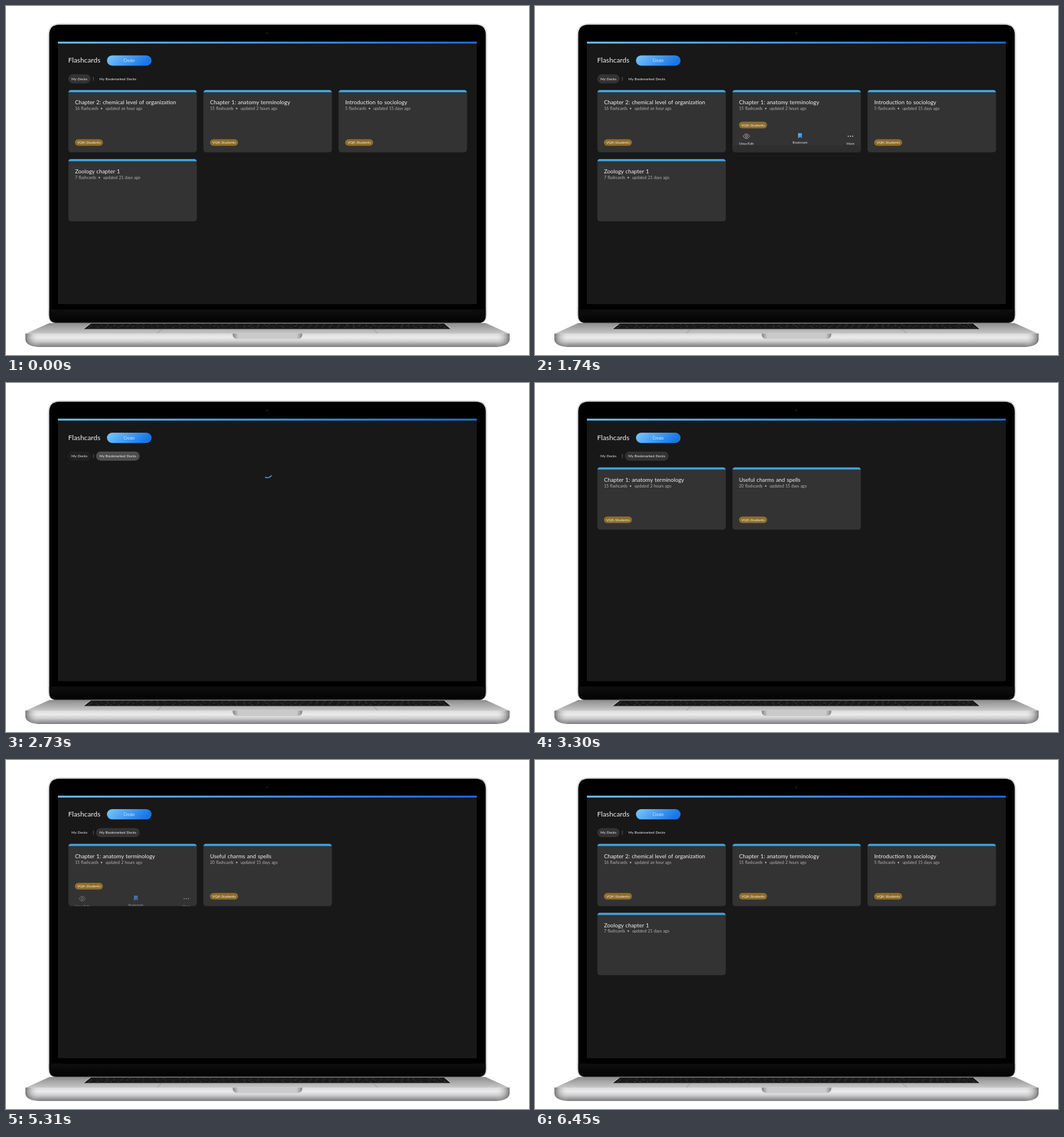
An HTML page for the animation above (6.51 s loop, 917x611 px).

```html
<!DOCTYPE html>
<html lang="en">
<head>
<meta charset="utf-8">
<title>Flashcards</title>
<style>
html, body { margin: 0; width: 100%; height: 100%; overflow: hidden; background: #fff; }
svg { display: block; width: 917px; height: 611px; }
text { font-family: Lato, "Open Sans", sans-serif; fill: #f2f2f2; word-spacing: .065em; }
.head { font-size: 12.3px; }
.title { font-size: 9.8px; }
.sub { font-size: 7px; fill: #b4b4b4; }
.tab { font-size: 6.3px; }
.tag { font-size: 6.5px; }
.act { font-size: 5.9px; fill: #dcdcdc; }
.mid { text-anchor: middle; }
.line { fill: none; stroke: #cfcfcf; stroke-width: .8; }
</style>
</head>
<body>
<svg viewBox="0 0 917 611" xmlns="http://www.w3.org/2000/svg">
  <defs>
    <linearGradient id="bar"><stop stop-color="#70c4fb"/><stop offset=".5" stop-color="#419bed"/><stop offset="1" stop-color="#1a70e0"/></linearGradient>
    <linearGradient id="btn" x2="1" y2=".25"><stop stop-color="#7ac8fc"/><stop offset="1" stop-color="#1976e6"/></linearGradient>
    <linearGradient id="mark" x2="1" y2="1"><stop stop-color="#6fc0fa"/><stop offset="1" stop-color="#1c78e6"/></linearGradient>
    <linearGradient id="shade" x2="0" y2="1"><stop stop-color="#2f2f2f"/><stop offset="1" stop-color="#272727"/></linearGradient>
    <linearGradient id="chin" x2="0" y2="1"><stop stop-color="#0f0f0f"/><stop offset="1" stop-color="#020202"/></linearGradient>
    <linearGradient id="deck" x2="0" y2="1"><stop stop-color="#8d8d8e"/><stop offset="1" stop-color="#c9c9ca"/></linearGradient>
    <linearGradient id="front" x2="0" y2="1"><stop stop-color="#dcdcdd"/><stop offset=".3" stop-color="#ebebec"/><stop offset=".58" stop-color="#cdcdce"/><stop offset=".8" stop-color="#a0a0a2"/><stop offset="1" stop-color="#7e7e80"/></linearGradient>
    <linearGradient id="ends"><stop stop-color="#444" stop-opacity=".7"/><stop offset=".012" stop-color="#777" stop-opacity=".3"/><stop offset=".03" stop-color="#fff" stop-opacity="0"/><stop offset=".97" stop-color="#fff" stop-opacity="0"/><stop offset=".988" stop-color="#777" stop-opacity=".3"/><stop offset="1" stop-color="#444" stop-opacity=".7"/></linearGradient>
    <linearGradient id="notch"><stop stop-color="#858587"/><stop offset=".08" stop-color="#cacacb"/><stop offset=".92" stop-color="#cacacb"/><stop offset="1" stop-color="#858587"/></linearGradient>
    <clipPath id="card"><rect width="225.3" height="109.3" rx="5"/></clipPath>
    <clipPath id="pill0"><rect x="109.3" y="119.6" width="39" height="15.8" rx="7.9"/></clipPath>
    <clipPath id="pill1"><rect x="157.8" y="119.6" width="76.6" height="15.8" rx="7.9"/></clipPath>
    <clipPath id="screen"><rect x="91" y="62.5" width="734.5" height="459.5"/></clipPath>
  </defs>
  <rect width="917" height="611" fill="#fff"/>

  <path d="M74 541V51Q74 31 94 31H823Q843 31 843 51V541Q843 555 830 555H87Q74 555 74 541Z" fill="#dfe3e1" stroke="#b5bab8" stroke-width=".6"/>
  <path d="M75.8 541V51Q75.8 32.8 94 32.8H823Q841.2 32.8 841.2 51V541Q841.2 554.5 829 554.5H88Q75.8 554.5 75.8 541Z" fill="#000"/>
  <path d="M75.8 531.5H841.2V541Q841.2 554.5 829 554.5H88Q75.8 554.5 75.8 541Z" fill="url(#chin)"/>
  <circle cx="458.3" cy="48" r="2.4" fill="#0b0d0d"/>
  <circle cx="457.8" cy="47.8" r=".8" fill="#26332f"/>
  <rect x="91" y="62.5" width="734.5" height="459.5" fill="#181818"/>
  <rect x="91" y="62.5" width="734.5" height="3.2" fill="url(#bar)"/>

  <path d="M34 574L76 555H841L883 574Z" fill="url(#deck)"/>
  <path d="M84 554.8H833" stroke="#5b5b5c" stroke-width=".8"/>
  <path d="M148 556H769L780 565.5H136Z" fill="#19191a"/>
  <path d="M148 556L136 565.5M769 556L780 565.5" stroke="#d6d6d7" stroke-width="1"/>
  <g id="keys" stroke="#5a5a5c" stroke-width=".6"></g>
  <path d="M273 566L265 573.5M644 566L652 573.5" stroke="#858586" stroke-width=".8"/>
  <path d="M34 573.5H883V584Q882 595 861 597H56Q35 595 34 584Z" fill="url(#front)"/>
  <path d="M34 573.5H883V584Q882 595 861 597H56Q35 595 34 584Z" fill="url(#ends)"/>
  <path d="M397.5 573.5H519.5V576Q519 583 510 583H407Q398 583 397.5 576Z" fill="url(#notch)"/>

  <g clip-path="url(#screen)">
    <g id="view">
      <text class="head" x="109" y="99.3">Flashcards</text>
      <rect x="177" y="86.5" width="78.2" height="18" rx="9" fill="url(#btn)"/>
      <text class="mid" x="216" y="98" style="font-size:6.7px;fill:#d8ecff">Create</text>
      <g clip-path="url(#pill0)"><rect id="bg0" x="109" y="119" width="40" height="17" fill="#333"/><circle id="wave0" cx="135" cy="127.5" fill="#fff"/></g>
      <g clip-path="url(#pill1)"><rect id="bg1" x="157" y="119" width="78" height="17" fill="#333"/><circle id="wave1" cx="214" cy="127.5" fill="#fff"/></g>
      <text class="tab mid" x="128.8" y="129.7">My Decks</text>
      <path d="M153.2 124V131" stroke="#777" stroke-width=".8"/>
      <text class="tab mid" x="196.1" y="129.7">My Bookmarked Decks</text>
      <g id="own"></g>
      <g id="saved"></g>
      <circle id="spin" cx="458.4" cy="156.5" r="8.8" fill="none" stroke="#4aa5ee" stroke-width="1.6"/>
    </g>
  </g>
</svg>
<script>
const LOOP = 6510;
const $ = id => document.getElementById(id);
const set = (id, attrs) => { for (const k in attrs) $(id).setAttribute(k, attrs[k]); };
const ramp = (t, a, len) => Math.min(1, Math.max(0, (t - a) / len));
const ease = u => u * u * (3 - 2 * u);
const pulse = (t, on, off, len) => ease(ramp(t, on, len)) - ease(ramp(t, off, len));

const actions = id => `
  <g id="${id}Acts">
    <rect y="96.5" width="226" height="50" fill="url(#shade)"/>
    <path class="line" d="M18.8 81Q24.5 72.6 30.2 81Q24.5 89.4 18.8 81Z"/>
    <circle class="line" cx="24.5" cy="81" r="1.8"/>
    <path id="${id}Mark" class="line" d="M115.3 75.8H122V85L118.65 82.3L115.3 85Z"/>
    ${[203.2, 207, 210.8].map(x => `<circle cx="${x}" cy="81" r="1" fill="#d8d8d8"/>`).join("")}
    <text class="act mid" x="24.5" y="95.8">View/Edit</text>
    <text class="act mid" x="118.7" y="94.2">Bookmark</text>
    <text class="act mid" x="207" y="95.8">More</text>
  </g>`;

function card(col, row, title, count, age, tagged, id) {
  const tag = `<g ${id ? `id="${id}Tag"` : ""}>
    <rect x="11.6" y="86.2" width="49.2" height="11.6" rx="5.8" fill="#8f6d2b"/>
    <text class="tag mid" x="36.2" y="94.2">VQK-Students</text></g>`;
  return `<g transform="translate(${109.2 + col * 236.9} ${147 + row * 120.8})"><g clip-path="url(#card)">
    <rect width="226" height="110" fill="#333"/>
    <rect width="226" height="4" fill="#3fa3da"/>
    <text class="title" x="11.7" y="25.2">${title}</text>
    <text class="sub" x="11.7" y="35">${count} flashcards<tspan dx="3.6">•</tspan><tspan dx="4.8">updated ${age} ago</tspan></text>
    ${id ? actions(id) : ""}${tagged ? tag : ""}
  </g></g>`;
}

const anatomy = "Chapter 1: anatomy terminology";
$("own").innerHTML =
  card(0, 0, "Chapter 2: chemical level of organization", 16, "an hour", true) +
  card(1, 0, anatomy, 15, "2 hours", true, "a") +
  card(2, 0, "Introduction to sociology", 5, "15 days", true) +
  card(0, 1, "Zoology chapter 1", 7, "21 days", false);
$("saved").innerHTML =
  card(0, 0, anatomy, 15, "2 hours", true, "b") +
  card(1, 0, "Useful charms and spells", 20, "15 days", true);

// Key glints: short ticks in three rows
let seed = 7;
const rnd = () => (seed = (seed * 16807) % 2147483647) / 2147483647;
let ticks = "";
for (let row = 0; row < 3; row++)
  for (let x = 150 - row * 3; x < 768 + row * 3; x += 9 + rnd() * 7) {
    const y = 557.6 + row * 2.7;
    ticks += `<path d="M${x.toFixed(1)} ${y}h${(1 + rnd() * 3).toFixed(1)}"/>`;
  }
$("keys").innerHTML = ticks;

function hover(id, k) {
  set(id + "Tag", { transform: `translate(0 ${-30.6 * k})` });
  set(id + "Acts", { transform: `translate(0 ${36 * (1 - k)})`, opacity: k });
}

function fillMark(id, on) {
  $(id + "Mark").style.cssText = on ? "fill:url(#mark);stroke:none" : "";
}

function wave(id, t, start) {
  const age = t - start;
  set(id, { r: age > 0 ? age * .215 : 0, opacity: age > 0 ? .2 * (1 - ramp(age, 250, 250)) : 0 });
}

function spinner(t) {
  const age = t > 5700 ? t - 5700 : t - 2570;
  const on = age > 0 && age < 330;
  const arc = 1 + 30 * ease(ramp(age, 30, 300));
  set("spin", {
    opacity: on ? 1 : 0,
    "stroke-dasharray": `${arc} 60`,
    transform: `rotate(${age * .25 - 8} 458.4 156.5)`
  });
}

function draw(t) {
  const dy = .5 * ease(ramp(t, 2010, 300)) - .95 * ease(ramp(t, 3990, 300));
  set("view", { transform: `translate(0 ${dy.toFixed(3)})` });

  set("own", { opacity: t < 2570 ? 1 : ease(ramp(t, 6030, 200)) });
  set("saved", { opacity: t < 5700 ? ease(ramp(t, 2900, 200)) : 0 });
  hover("a", pulse(t, 660, 1980, 270));
  hover("b", pulse(t, 3600, 5190, 270));
  fillMark("a", t > 1440 && t < 5700);
  fillMark("b", true);

  set("bg0", { opacity: 1 - ease(ramp(t, 2640, 150)) + ease(ramp(t, 5490, 150)) });
  set("bg1", { opacity: pulse(t, 2250, 5830, 150) });
  wave("wave0", t, 5655);
  wave("wave1", t, 2388);
  spinner(t);
}

const begin = performance.now();
function tick() {
  draw((performance.now() - begin) % LOOP);
  requestAnimationFrame(tick);
}
draw(0);
requestAnimationFrame(tick);
</script>
</body>
</html>
```
